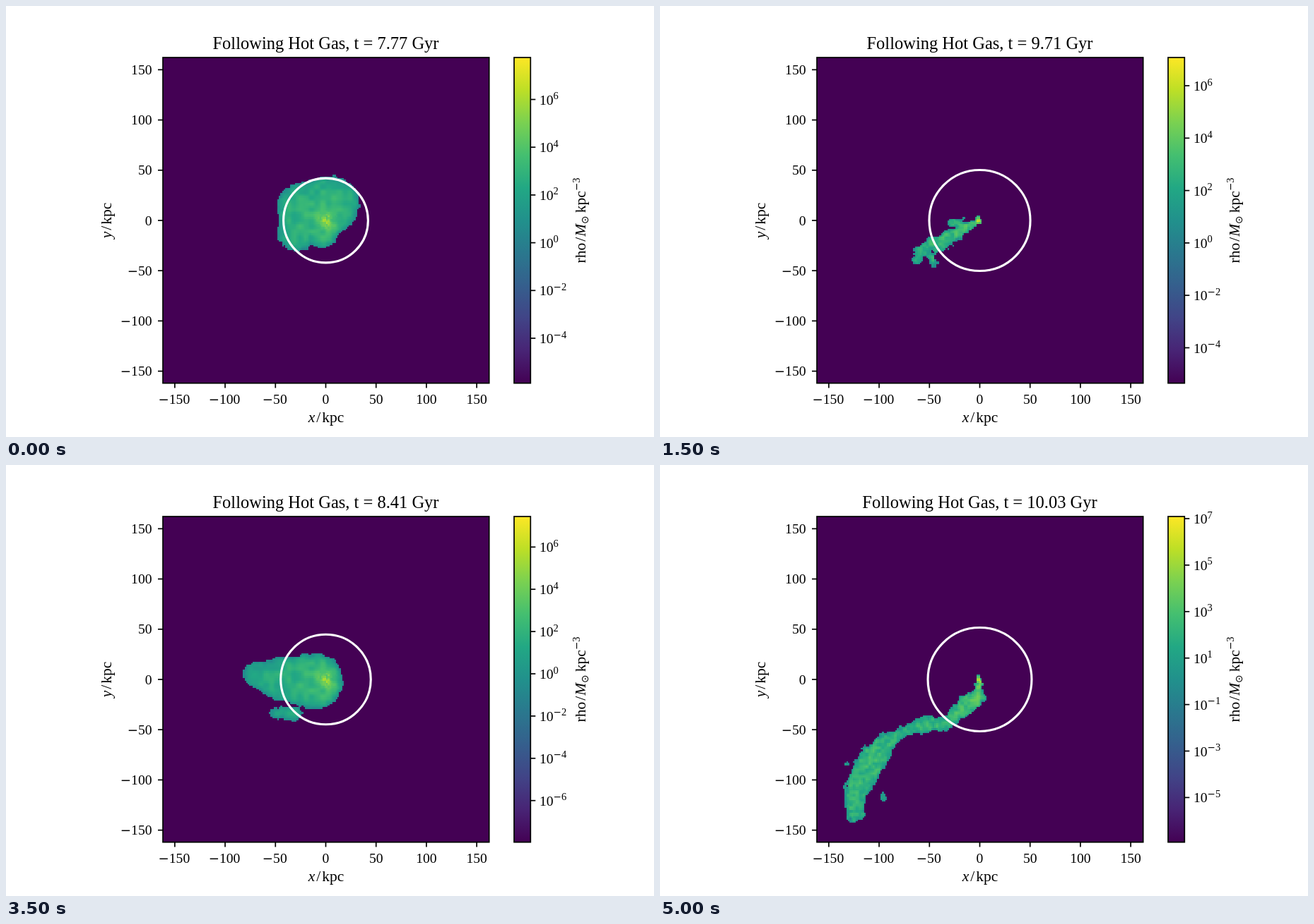
Animation, 917 px wide and 611 px high, one loop 5500 ms. Source, as an HTML page with a canvas:

```html
<!DOCTYPE html>
<html lang="en">
<head>
<meta charset="utf-8">
<title>Gas density</title>
<style>
html, body { margin: 0; width: 100%; height: 100%; overflow: hidden; background: #fff; }
canvas { position: absolute; left: 222px; top: 73px; width: 461.5px; height: 461.5px; image-rendering: pixelated; }
svg { position: absolute; left: 0; top: 0; }
text { font-family: "Liberation Serif", serif; font-size: 19.6px; fill: #000; white-space: pre; }
.minus { font-family: "DejaVu Sans", sans-serif; font-size: .93em; }
.sun { font-family: "DejaVu Sans", sans-serif; font-size: 14px; }
.small { font-size: 14.5px; }
.mid { text-anchor: middle; }
.end { text-anchor: end; }
.name { font-size: 21.5px; }
.title { font-size: 24.5px; }
.it { font-style: italic; }
.line { fill: none; stroke: #000; stroke-width: 1.7; }
</style>
</head>
<body>
<canvas id="gas" width="200" height="200"></canvas>
<svg width="917" height="611" viewBox="0 0 917 611">
  <defs>
    <linearGradient id="scale" x1="0" y1="1" x2="0" y2="0"></linearGradient>
  </defs>
  <circle id="ring" cx="452.5" cy="304" fill="none" stroke="#fff" stroke-width="3.1"/>
  <rect x="719" y="73" width="23.3" height="461.7" fill="url(#scale)"/>
  <rect class="line" x="719" y="73" width="23.3" height="461.7"/>
  <rect class="line" x="222" y="73" width="461.7" height="461.7"/>
  <text id="title" class="mid title" x="452.5" y="61"></text>
  <g id="axes"></g>
  <g id="bar"></g>
  <text class="mid name" x="453" y="590"><tspan class="it">x</tspan><tspan dx="2">/</tspan><tspan dx="2">kpc</tspan></text>
  <text class="mid name" transform="translate(149 304) rotate(-90)"><tspan class="it">y</tspan><tspan dx="2">/</tspan><tspan dx="2">kpc</tspan></text>
  <text class="mid name" transform="translate(820 304) rotate(-90)">rho<tspan dx="2">/</tspan><tspan class="it" dx="1">M</tspan><tspan class="sun" dy="4">⊙</tspan><tspan dx="4" dy="-4">kpc</tspan><tspan class="small" dy="-8"><tspan class="minus">−</tspan>3</tspan></text>
</svg>
<script>
const $ = id => document.getElementById(id);
const CENTER = { x: 452.5, y: 304 }, LEFT = 222, TOP = 73, SIZE = 461.5, BOTTOM = TOP + SIZE;
const CELLS = 200, STEP = 500;
const VIRIDIS = ['440154', '482475', '414487', '355f8d', '2a788e', '21918c', '22a884', '44bf70', '7ad151', 'bddf26', 'fde725'];
const RGB = VIRIDIS.map(h => [0, 2, 4].map(k => parseInt(h.slice(k, k + 2), 16)));

const clamp = (v, a, b) => Math.min(b, Math.max(a, v));
const lerp = (a, b, u) => a + (b - a) * u;

function viridis(v) {
  const p = clamp(v, 0, 1) * 10, k = Math.min(9, Math.floor(p));
  return RGB[k].map((c, n) => lerp(c, RGB[k + 1][n], p - k));
}

function hash(x, y) {
  const s = Math.sin(x * 127.1 + y * 311.7) * 43758.5453;
  return s - Math.floor(s);
}

// Smooth value noise in -1..1
function noise(x, y) {
  const i = Math.floor(x), j = Math.floor(y);
  const ease = u => u * u * (3 - 2 * u), u = ease(x - i), v = ease(y - j);
  return 2 * lerp(lerp(hash(i, j), hash(i + 1, j), u), lerp(hash(i, j + 1), hash(i + 1, j + 1), u), v) - 1;
}

// Depth below the surface of a tapered tube between two [x, y, radius] knots
function tubeDepth(a, b, x, y) {
  const dx = b[0] - a[0], dy = b[1] - a[1];
  const u = clamp(((x - a[0]) * dx + (y - a[1]) * dy) / (dx * dx + dy * dy || 1), 0, 1);
  return lerp(a[2], b[2], u) - Math.hypot(x - a[0] - u * dx, y - a[1] - u * dy);
}

const cloudDepth = (cloud, x, y) => Math.max(...cloud.map(chain =>
  Math.max(...chain.map((knot, k) => tubeDepth(chain[Math.max(0, k - 1)], knot, x, y)))));

// age: snapshots since the earliest one; bar: top exponent, its y, pixels per two decades;
// cloud: chains of [x, y, radius] knots
const scenes = [
  { age: 2, bar: [6, 132.5, 67.7], gain: 0.14,
    cloud: [[[411, 319, 28], [420, 287, 37], [458, 281, 41], [446, 318, 25]]] },
  { age: 7, bar: [6, 122, 69], gain: 0.19, clumpy: true,
    cloud: [[[452, 304, 5], [430, 314, 12], [405, 325, 12]]] },
  { age: 1, bar: [6, 83, 80.4], gain: 0.2, title: 'Hot/LowDens Gas',
    cloud: [[[426, 312, 29], [430, 281, 32], [458, 284, 31], [455, 312, 29]]] },
  { age: 8, bar: [6, 113, 74.3], gain: 0.18, clumpy: true,
    cloud: [[[452, 304, 5], [432, 314, 7], [400, 334, 12], [368, 345, 8], [363, 362, 5]],
      [[413, 307, 6], [424, 306, 6]], [[380, 345, 6], [387, 362, 5]]] },
  { age: 0, bar: [6, 100, 76], gain: 0.15,
    cloud: [[[345, 298, 22], [400, 296, 42], [440, 298, 49]]] },
  { age: 5, bar: [7, 75, 59.8], gain: 0.17,
    cloud: [[[389, 274, 13], [395, 300, 22], [439, 304, 25], [421, 341, 31], [456, 356, 13]],
      [[327, 330, 13]], [[341, 309, 6]], [[367, 325, 11]]] },
  { age: 10, bar: [7, 80, 65], gain: 0.2, clumpy: true,
    cloud: [[[452, 304, 4], [440, 335, 13], [400, 372, 10], [320, 420, 17], [265, 480, 20], [236, 522, 14]]] },
  { age: 4, bar: [6, 116.3, 59.9], gain: 0.14,
    cloud: [[[354, 297, 18], [390, 303, 31], [437, 306, 40]], [[382, 351, 8], [408, 352, 10]]] },
  { age: 3, bar: [6, 110, 65.5], gain: 0.14,
    cloud: [[[385, 305, 28], [430, 302, 49]]] },
  { age: 6, bar: [6, 124, 82.4], gain: 0.17,
    cloud: [[[431, 304, 6.5], [449, 308, 10], [459, 294, 6]], [[437, 319, 4.5]]] },
  { age: 9, bar: [7, 76, 65.9], gain: 0.2, clumpy: true,
    cloud: [[[452, 304, 4], [449, 330, 11], [436, 338, 14], [405, 367, 8], [375, 368, 12], [340, 378, 6],
      [320, 394, 15], [302, 415, 20], [286, 445, 20], [275, 465, 16], [276, 493, 13]],
      [[263, 424, 5]], [[315, 471, 5]]] },
];

function density({ cloud, gain, clumpy }, x, y) {
  const [rough, soft, grain, patch] = clumpy ? [3.5, 2.5, 0.08, 4.5] : [1.8, 4.5, 0.05, 8];
  const depth = cloudDepth(cloud, x, y) + rough * noise(x / 5, y / 5);
  if (depth < 0) return 0;
  const far = Math.hypot(x - CENTER.x, y - CENTER.y);
  const body = gain + 0.13 * Math.exp(-far / 38) + grain * noise(x / patch, y / patch);
  const core = 0.2 * Math.exp(-far / 5) * (1 + noise(x / 2, y / 2));
  return 0.45 + (1 - Math.exp(-depth / soft)) * body + core;
}

const pen = $('gas').getContext('2d');
function paint(scene) {
  const image = pen.createImageData(CELLS, CELLS), cell = SIZE / CELLS;
  for (let n = 0; n < CELLS * CELLS; n++) {
    const x = LEFT + (n % CELLS + 0.5) * cell, y = TOP + (Math.floor(n / CELLS) + 0.5) * cell;
    image.data.set([...viridis(density(scene, x, y)), 255], n * 4);
  }
  return image;
}

const signed = v => (v < 0 ? '<tspan class="minus">−</tspan>' : '') + Math.abs(v);
const tick = d => `<path class="line" d="${d}"/>`;

function drawAxes() {
  let out = '';
  for (let v = -150; v <= 150; v += 50) {
    const x = CENTER.x + v * 1.4243, y = CENTER.y - v * 1.4243;
    out += tick(`M${x} ${BOTTOM}v7`) + tick(`M${LEFT} ${y}h-7`)
      + `<text class="mid" x="${v < 0 ? x - 1 : x}" y="564">${signed(v)}</text>`
      + `<text class="end" x="206.5" y="${y + 6.5}">${signed(v)}</text>`;
  }
  $('axes').innerHTML = out;
  $('scale').innerHTML = VIRIDIS.map((c, k) => `<stop offset="${k / 10}" stop-color="#${c}"/>`).join('');
}

function barTicks([exponent, y, gap]) {
  let out = '';
  for (; y < BOTTOM; y += gap, exponent -= 2) {
    out += tick(`M742.3 ${y}h7`)
      + `<text x="755" y="${y + 7}">10<tspan class="small" dy="-7.5">${signed(exponent)}</tspan></text>`;
  }
  return out;
}

let shown = -1;
function render(ms) {
  const index = Math.floor(ms / STEP) % scenes.length;
  if (index === shown) return;
  shown = index;
  const { age, bar, image, title = 'Following Hot Gas' } = scenes[index];
  $('title').textContent = `${title}, t = ${(7.12 + age * 0.3235).toFixed(2)} Gyr`;
  $('ring').setAttribute('r', 56 + age * 1.94);
  $('bar').innerHTML = barTicks(bar);
  pen.putImageData(image, 0, 0);
}

drawAxes();
scenes.forEach(scene => { scene.image = paint(scene); });
const start = performance.now();
function loop() {
  render(performance.now() - start);
  requestAnimationFrame(loop);
}
loop();
</script>
</body>
</html>
```
